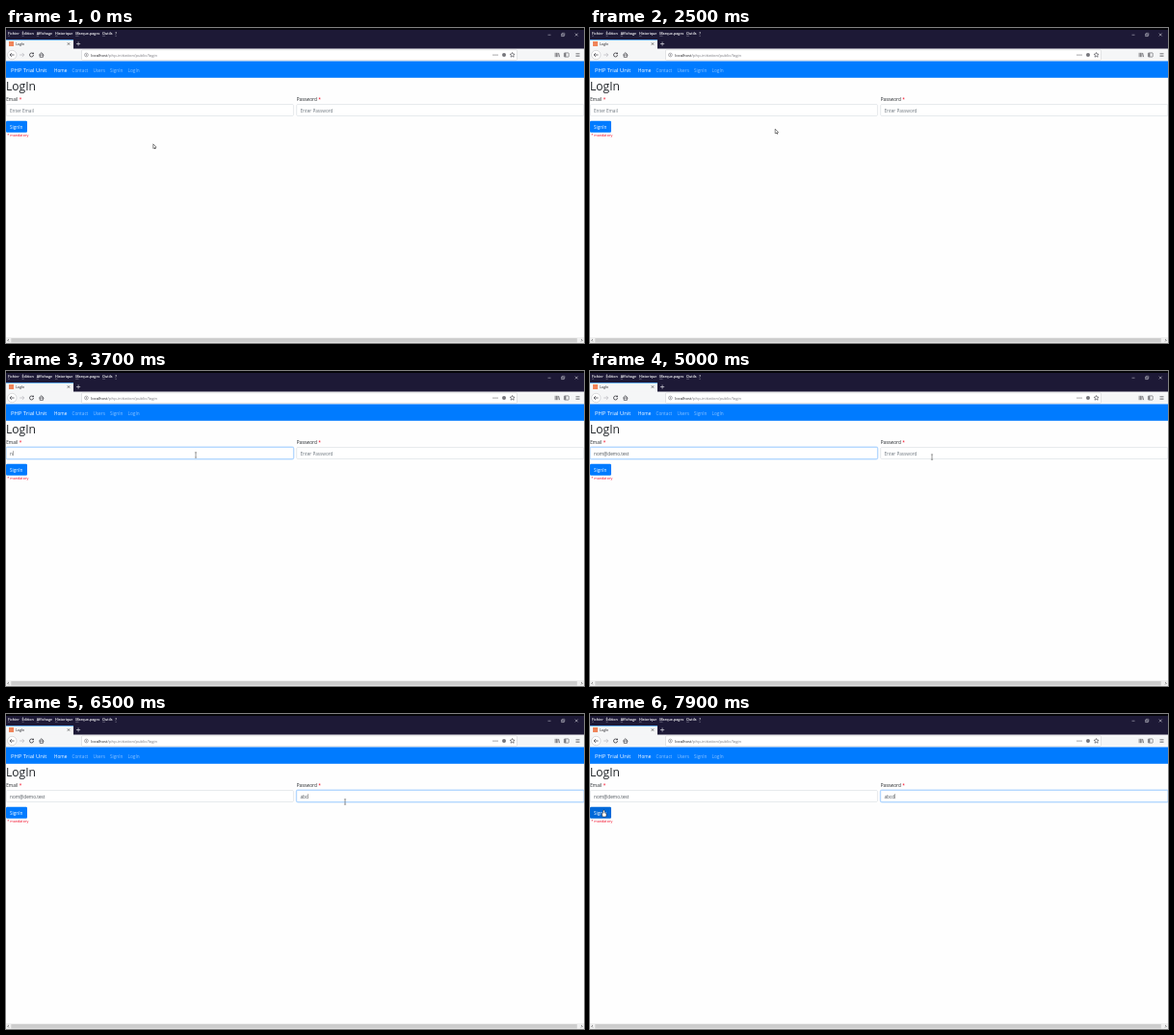
Write an HTML page with a canvas that moves like this. It is 600x328 px and loops after 8000 ms.

```html
<!DOCTYPE html>
<html lang="fr">
<head>
<meta charset="utf-8">
<title>LogIn</title>
<style>
html, body { margin: 0; width: 100%; height: 100%; overflow: hidden; background: #fefefe; }
canvas { display: block; width: 600px; height: 328px; }
</style>
</head>
<body>
<canvas id="stage"></canvas>
<script>
const W = 600, H = 328, LOOP = 8000, STEP = 100;
const canvas = document.getElementById('stage');
const ctx = canvas.getContext('2d');
const dpr = window.devicePixelRatio || 1;
canvas.width = W * dpr;
canvas.height = H * dpr;

const FONT = '"Open Sans", "Noto Sans", sans-serif';
const INK = '#3c3c42', BODY = '#212529', RED = '#f5001d';
const EMAIL = 'nom@demo.test', PASSWORD = 'abcd';
const EMAIL_FOCUS = 3300, PASSWORD_FOCUS = 5300;

const HOME = { x: 152.8, y: 120.8 };
const MOVES = [
  { from: 0, to: 500, x: 153, y: 91 },
  { from: 900, to: 1300, x: 203.5, y: 172 },
  { from: 1700, to: 2500, x: 192.2, y: 105.2 },
  { from: 2500, to: 3000, x: 197, y: 87.5 },
  { from: 4600, to: 5000, x: 355, y: 89.6 },
  { from: 5700, to: 6400, x: 352, y: 91.5 },
  { from: 7000, to: 7900, x: 14.4, y: 100 }
];

const clamp = v => Math.min(1, Math.max(0, v));
const ease = k => k * k * (3 - 2 * k);

function pointerAt(t) {
  return MOVES.reduce((p, m) => {
    const k = ease(clamp((t - m.from) / (m.to - m.from)));
    return { x: p.x + (m.x - p.x) * k, y: p.y + (m.y - p.y) * k };
  }, HOME);
}

function typedEmail(t) {
  return t < 3700 ? '' : EMAIL.slice(0, 1 + Math.max(0, Math.ceil((t - 3800) / 75)));
}

function typedPassword(t) {
  return PASSWORD.slice(0, Math.max(0, Math.floor((t - 5630) / 270)));
}

function rect(x, y, w, h, color) {
  ctx.fillStyle = color;
  ctx.fillRect(x, y, w, h);
}

function paint(fill, stroke, width = 0.5) {
  if (fill) { ctx.fillStyle = fill; ctx.fill(); }
  if (stroke) { ctx.strokeStyle = stroke; ctx.lineWidth = width; ctx.stroke(); }
}

function box(x, y, w, h, r, fill, stroke, width) {
  ctx.beginPath();
  ctx.roundRect(x, y, w, h, r);
  paint(fill, stroke, width);
}

function circle(x, y, r, fill, stroke, width) {
  ctx.beginPath();
  ctx.arc(x, y, r, 0, Math.PI * 2);
  paint(fill, stroke, width);
}

function line(x1, y1, x2, y2, color, width = 0.6) {
  ctx.beginPath();
  ctx.moveTo(x1, y1);
  ctx.lineTo(x2, y2);
  paint(null, color, width);
}

function setFont(size, weight = 400) {
  ctx.font = `${weight} ${size}px ${FONT}`;
}

// Draws text and returns the x of its end
function text(str, x, y, size, color, weight) {
  setFont(size, weight);
  ctx.fillStyle = color;
  ctx.fillText(str, x, y);
  return x + ctx.measureText(str).width;
}

// Places labels with equal gaps so that the last one starts at lastX
function spread(labels, x, lastX, size, weight, drawLabel) {
  setFont(size, weight);
  const widths = labels.map(s => ctx.measureText(s).width);
  const used = widths.slice(0, -1).reduce((a, b) => a + b, 0);
  const gap = (lastX - x - used) / (labels.length - 1);
  labels.forEach((label, i) => {
    drawLabel(label, x, i);
    x += widths[i] + gap;
  });
}

function cross(x, y, r, color) {
  line(x - r, y - r, x + r, y + r, color);
  line(x + r, y - r, x - r, y + r, color);
}

function chevron(x, y, dir, r, color) {
  line(x - dir * r, y - r, x, y, color, 0.7);
  line(x - dir * r, y + r, x, y, color, 0.7);
}

function arrowIcon(x, y, dir, color) {
  line(x - 2.3, y, x + 2.3, y, color, 0.7);
  chevron(x + dir * 2.3, y, dir, 1.9, color);
}

function star(x, y, r, color) {
  ctx.beginPath();
  for (let i = 0; i < 10; i++) {
    const a = i * Math.PI / 5 - Math.PI / 2, d = i % 2 ? r * 0.48 : r;
    ctx.lineTo(x + d * Math.cos(a), y + d * Math.sin(a));
  }
  ctx.closePath();
  paint(null, color, 0.6);
}

function drawTitleBar() {
  rect(0, 0, W, 22, '#1d1936');
  rect(0, 0, W, 2, '#050509');
  const menus = ['Fichier', 'Édition', 'Affichage', 'Historique', 'Marque-pages', 'Outils', '?'];
  spread(menus, 2, 113.3, 3.65, 600, (label, x) => {
    text(label, x, 7.2, 3.65, '#fff', 600);
    rect(x, 7.9, ctx.measureText(label[0]).width, 0.35, '#c8c8d4');
  });
  line(562.5, 7.2, 565.5, 7.2, '#d8d8e0', 0.5);
  box(576.6, 6, 2.6, 2.6, 0, null, '#d8d8e0', 0.5);
  box(577.4, 5.2, 2.6, 2.6, 0, null, '#d8d8e0', 0.3);
  cross(592.2, 7, 1.4, '#d8d8e0');

  rect(0, 12, 70, 10, '#f5f6f7');
  rect(0, 12, 70, 0.6, '#0a84ff');
  rect(3, 14, 5, 5, '#f0855a');
  text('LogIn', 10, 18, 3.6, '#1a1a1f');
  cross(65, 16.5, 1.2, '#333');
  line(73, 16.5, 77.2, 16.5, '#f0f0f5');
  line(75.1, 14.4, 75.1, 18.6, '#f0f0f5');
}

function drawToolbar() {
  rect(0, 21.5, W, 13.1, '#f5f6f7');
  circle(6.3, 28, 4.7, '#fff', '#b8b8bd');
  arrowIcon(6.3, 28, -1, INK);
  arrowIcon(16.5, 28, 1, '#b7b7bc');
  ctx.beginPath();
  ctx.arc(26.5, 28, 2, 0, Math.PI * 1.6);
  paint(null, INK, 0.8);
  rect(27.2, 25.7, 1.7, 1.5, INK);
  line(34.2, 28.2, 36.8, 25.7, INK, 0.8);
  line(36.8, 25.7, 39.4, 28.2, INK, 0.8);
  box(35.2, 28, 3.2, 2.3, 0, null, INK, 0.7);

  box(78.5, 22.8, 452, 10.6, 1, '#fff', '#cbcbce');
  circle(83.4, 28, 1.9, null, '#6a6a70');
  line(83.4, 27, 83.4, 29.1, '#6a6a70');
  const x = text('localhost', 88.2, 29.7, 4.15, '#1c1c20');
  text('/php-initiation/public/login', x, 29.7, 4.15, '#77777d');

  for (let i = 0; i < 3; i++) {
    circle(506 + i * 2, 28, 0.6, INK);
    rect(569.8 + i * 1.4, 25.8, 0.6, 4.4, INK);
    rect(591.5, 26.2 + i * 1.6, 4, 0.5, INK);
  }
  circle(517, 28, 2, '#77777c');
  star(525.6, 28.1, 2.6, INK);
  line(573.6, 26, 574.7, 30.2, INK);
  box(579.4, 25.9, 4.8, 4.2, 0.5, null, INK);
  rect(579.6, 26.1, 1.8, 3.8, '#77777c');
}

function drawNav() {
  rect(0, 34.5, W, 17.3, '#007bff');
  text('PHP Trial Unit', 5, 46.2, 5.85, '#fff', 500);
  spread(['Home', 'Contact', 'Users', 'SignIn', 'LogIn'], 50, 126.6, 4.7, 400, (label, x, i) =>
    text(label, x, 45.7, 4.7, i ? 'rgba(255,255,255,.55)' : '#fff'));
}

function drawField(label, x, value, focusAge) {
  const w = 298.2, focused = focusAge >= 0;
  text('*', text(label, x, 75.9, 4.7, BODY) + 1.5, 75.9, 4.7, RED);
  if (focused) box(x - 0.4, 79.1, w + 0.8, 12.8, 1.6, null, 'rgba(0,123,255,.25)', 1.1);
  box(x, 79.5, w, 12, 1.2, '#fff', focused ? '#80bdff' : '#ced4da');
  const end = text(value, x + 3.8, 87.8, 4.7, '#495057');
  if (!value) text('Enter ' + label, x + 3.8, 87.8, 4.7, '#6c757d');
  if (focused && focusAge % 1060 < 530) rect(end + 0.2, 83.2, 0.45, 5, '#444');
}

function drawForm(t, hover) {
  text('LogIn', 0, 65.2, 12.1, BODY, 500);
  drawField('Email', 0.2, typedEmail(t), t < PASSWORD_FOCUS ? t - EMAIL_FOCUS : -1);
  drawField('Password', 301.7, typedPassword(t), t - PASSWORD_FOCUS);
  box(0, 96.8, 22, 11.9, 1.2, hover ? '#0069d9' : '#007bff');
  text('SignIn', 4, 104.8, 4.7, '#fff', 500);
  text('* mandatory', 1.3, 113, 3.7, RED, 500);
}

function drawScrollbar() {
  rect(0, 322, W, 6, '#f0f0f0');
  rect(5.3, 323, 587.5, 4.4, '#cdcdcd');
  chevron(1.7, 325.2, -1, 1.2, '#505050');
  chevron(598.3, 325.2, 1, 1.2, '#505050');
}

function drawBeam(x, y) {
  line(x, y - 2.7, x, y + 2.7, '#444', 0.55);
  for (const dy of [-2.7, 2.7]) line(x - 1.1, y + dy, x + 1.1, y + dy, '#555', 0.5);
}

function drawHand(x, y) {
  box(x - 0.7, y, 1.4, 5, 0.6, '#fff', '#111');
  box(x - 1.8, y + 3, 4.4, 4, 1, '#fff', '#111');
  rect(x - 0.4, y + 1, 0.8, 3, '#fff');
}

function drawArrow(x, y) {
  line(x + 1.2, y + 3, x + 2.3, y + 5.2, '#111', 1);
  ctx.beginPath();
  ctx.moveTo(x, y);
  ctx.lineTo(x, y + 4.6);
  ctx.lineTo(x + 3.3, y + 3.4);
  ctx.closePath();
  paint('#fff', '#111');
}

function pointerKind({ x, y }) {
  if (y > 79.5 && y <= 92 && (x < 298.5 || x > 301.5)) return drawBeam;
  if (x < 22 && y > 96.5 && y < 108.5) return drawHand;
  return drawArrow;
}

function draw(now) {
  const t = Math.floor(now % LOOP / STEP) * STEP;
  const p = pointerAt(t);
  const drawPointer = pointerKind(p);
  ctx.setTransform(dpr, 0, 0, dpr, 0, 0);
  rect(0, 0, W, H, '#fefefe');
  drawTitleBar();
  drawToolbar();
  drawNav();
  drawForm(t, drawPointer === drawHand);
  drawScrollbar();
  drawPointer(p.x, p.y);
}

const start = performance.now();
function tick() {
  draw(performance.now() - start);
  requestAnimationFrame(tick);
}
tick();
</script>
</body>
</html>
```
